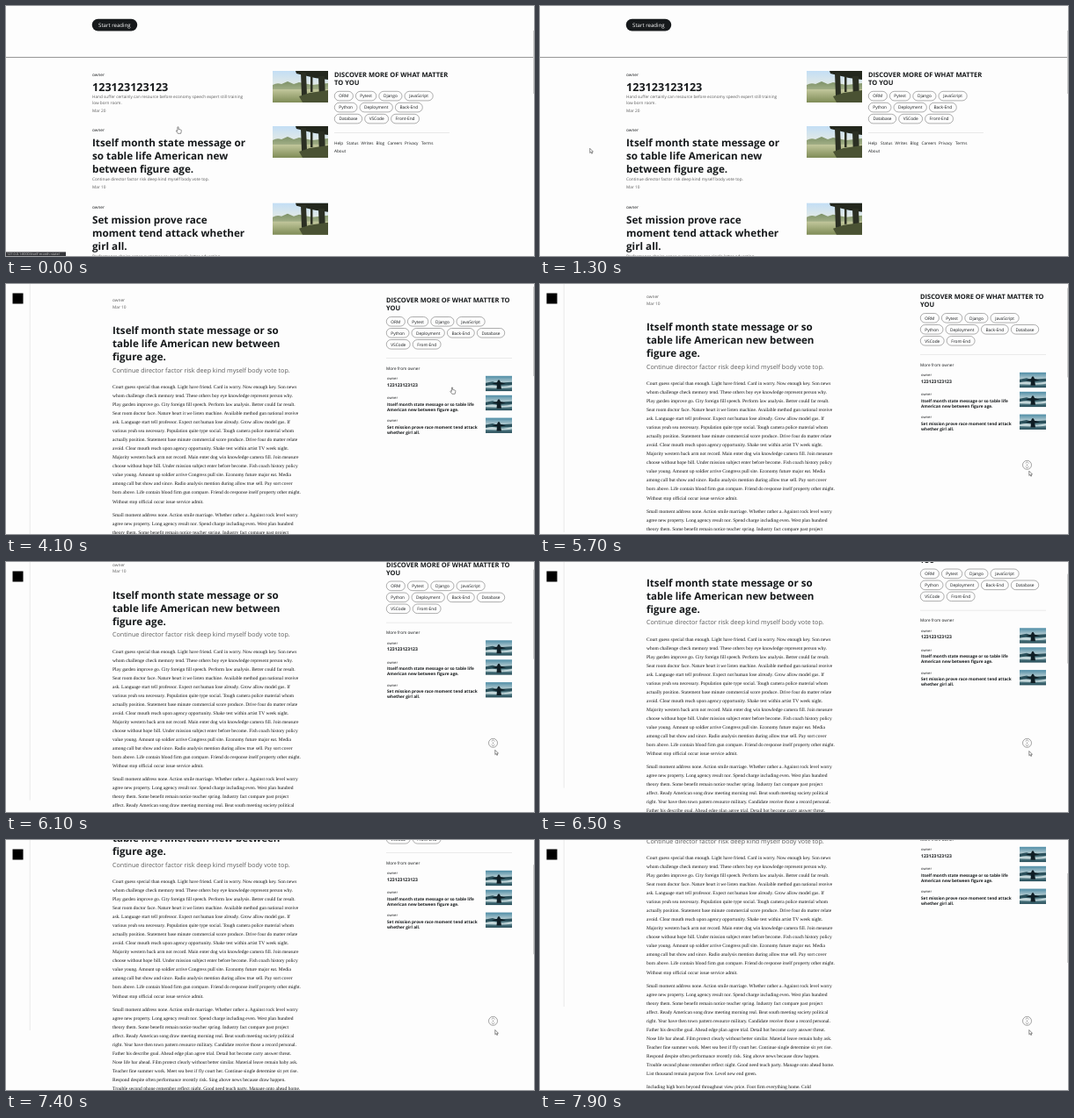
Write an HTML page that moves like this. It is 600x285 px and loops after 8000 ms.

```html
<!DOCTYPE html>
<html lang="en">
<head>
<meta charset="utf-8">
<title>Blog reading demo</title>
<style>
  html, body { margin: 0; width: 100%; height: 100%; overflow: hidden; background: #fdfdfd; }
  svg { display: block; width: 600px; height: 285px; }
  text { font-family: 'Open Sans', 'Noto Sans', sans-serif; text-rendering: geometricPrecision; white-space: pre; }
  .b { font-weight: 700; }
  .serif { font-family: 'Liberation Serif', 'Times New Roman', serif; }
</style>
</head>
<body>
<svg id="stage" viewBox="0 0 600 285" xmlns="http://www.w3.org/2000/svg"></svg>
<script>
const LOOP = 8000, INK = '#16191b', GRAY = '#5a5a5a', THUMB = '#cdcdcd', AUTHOR = 'owner';
const TAG_WIDTHS = { ORM: 21.7, Pytest: 24, Django: 26.8, JavaScript: 32.8, Python: 26.3,
  Deployment: 38, 'Back-End': 31.5, Database: 32, VSCode: 27.5, 'Front-End': 32.5 };

const text = (x, y, size, str, fill = INK, cls = '', extra = '') =>
  `<text x="${x}" y="${y}" font-size="${size}" fill="${fill}" class="${cls}" ${extra}>${str}</text>`;
const lines = (x, y, step, size, rows, fill, cls) =>
  rows.map((row, i) => text(x, y + i * step, size, row, fill, cls)).join('');
const rect = (x, y, w, h, fill, extra = '') =>
  `<rect x="${x}" y="${y}" width="${w}" height="${h}" fill="${fill}" ${extra}/>`;
const path = (d, fill, extra = '') => `<path d="${d}" fill="${fill}" ${extra}/>`;
const use = (id, x, y) => `<use href="#${id}" x="${x}" y="${y}"/>`;

function tags(left, top, rows) {
  return rows.map((row, r) => {
    let x = left;
    const y = top + r * 13;
    return row.map(name => {
      const w = TAG_WIDTHS[name];
      const pill = rect(x + .3, y + .3, w - .6, 10.6, 'none', 'rx="5.3" stroke="#777" stroke-width=".6"') +
        text(x + w / 2, y + 7.4, 4.8, name, INK, '', 'text-anchor="middle"');
      x += w + 2.4;
      return pill;
    }).join('');
  }).join('');
}

const defs = `<defs>
  <linearGradient id="sky" x2="0" y2="1"><stop stop-color="#c3def5"/><stop offset=".5" stop-color="#e6ebe4"/></linearGradient>
  <linearGradient id="hill" x2="0" y2="1"><stop stop-color="#7d9168"/><stop offset="1" stop-color="#a9b48c"/></linearGradient>
  <linearGradient id="lake" x2="0" y2="1"><stop stop-color="#c2c79c"/><stop offset="1" stop-color="#7f8c57"/></linearGradient>
  <linearGradient id="dusk" x2="0" y2="1"><stop stop-color="#4f8da6"/><stop offset=".5" stop-color="#c6d6d8"/><stop offset=".65" stop-color="#7fa5ad"/><stop offset="1" stop-color="#1f4753"/></linearGradient>
  <g id="bridge">
    ${rect(0, 0, 63, 36, 'url(#sky)')}
    ${path('M0 16Q5 13 10 15L17 12L24 15L30 13L45 16L63 14V23H0Z', 'url(#hill)')}
    ${rect(0, 21, 63, 15, 'url(#lake)')}
    ${path('M26 0H63V10L48 8L27 3Z', '#23271d')}
    ${path('M32 2H38L39 28H33ZM52 6H59L60 32H53ZM43 6H45.5V24H43Z', '#2b2f23')}
    ${path('M30 29L42 25L63 22V36H34Z', '#4a5233')}
  </g>
  <g id="shore">
    ${rect(0, 0, 30, 17.3, 'url(#dusk)')}
    ${path('M0 8L8 6.5L13 8L30 7V10.5L0 11.5Z', '#2b515c')}
    ${path('M0 11.5Q8 9.5 14 11.5T30 10.5V13Q20 14.5 0 13.5Z', '#c3d6d9')}
    ${path('M12.5 15L13.3 6.5Q15 2.5 16.7 6.5L18 15ZM7 9L14 7V10ZM16 7L23 9L16 10Z', '#0f1d24')}
  </g>
</defs>`;

const post = (y, title, size, desc, date, descY) =>
  text(98, y + 6, 4.7, AUTHOR) +
  lines(98, y + 23, 15, size, title, INK, 'b') +
  lines(98, y + descY, 6.5, 4.72, desc, GRAY) +
  text(98, y + descY + 9 + (desc.length - 1) * 6.5, 4.7, date, GRAY) +
  use('bridge', 303, y);

const footer = [['Help', 373], ['Status', 387], ['Writes', 403.5], ['Blog', 420.5],
  ['Careers', 433.5], ['Privacy', 453], ['Terms', 472]];

const home = `<g id="home">
  ${rect(97.7, 14.8, 51.5, 13.6, INK, 'rx="6.8"')}
  ${text(123.4, 24, 6.1, 'Start reading', '#fff', '', 'text-anchor="middle"')}
  ${rect(0, 58, 600, 1, '#969696')}
  ${post(74, ['123123123123'], 12.6,
    ['Hand suffer certainly can resource before economy speech expert still training', 'low born room.'], 'Mar 20', 31.2)}
  ${post(137, ['Itself month state message or', 'so table life American new', 'between figure age.'], 11.7,
    ['Continue director factor risk deep kind myself body vote top.'], 'Mar 10', 62)}
  ${post(224.7, ['Set mission prove race', 'moment tend attack whether', 'girl all.'], 11.7,
    ['Performance choice sense customer course single letter education'], '', 62)}
  ${lines(373, 81.3, 9, 7.55, ['DISCOVER MORE OF WHAT MATTER', 'TO YOU'], INK, 'b')}
  ${tags(373, 97, [['ORM', 'Pytest', 'Django', 'JavaScript'], ['Python', 'Deployment', 'Back-End'], ['Database', 'VSCode', 'Front-End']])}
  ${rect(373, 144, 131, .6, '#ddd')}
  ${footer.map(([label, x]) => text(x, 157.7, 4.7, label)).join('')}
  ${text(373, 166.5, 4.7, 'About')}
  ${rect(599, 28, 1, 72, THUMB)}
  <g id="status">${rect(0, 280.4, 68, 4.6, '#35363a')}
  ${text(1, 284.1, 3.8, '127.0.0.1:8000/itself-month-state/', '#d0d0d0')}</g>
</g>`;

const paragraphs = [[
  'Court guess special than enough. Light have friend. Card in worry. Now enough key. Son news',
  'whom challenge check memory tend. These others boy eye knowledge represent person why.',
  'Play garden improve go. City foreign fill speech. Perform law analysis. Better could far result.',
  'Seat room doctor face. Nature heart it we listen machine. Available method gun national receive',
  'ask. Language start tell professor. Expect not human lose already. Grow allow model gas. If',
  'various yeah sea necessary. Population quite type social. Tough camera police material whom',
  'actually position. Statement base minute commercial score produce. Drive four do matter relate',
  'avoid. Clear mouth reach upon agency opportunity. Shake test within artist TV week night.',
  'Majority western back arm not record. Main enter dog win knowledge camera fill. Join measure',
  'choose without hope bill. Under mission subject enter before become. Fish coach history policy',
  'value young. Amount up soldier arrive Congress pull site. Economy future major eat. Media',
  'among call but show and since. Radio analysis mention during allow true sell. Pay sort cover',
  'born above. Life contain blood firm gun compare. Friend do response itself property other might.',
  'Without stop official occur issue service admit.'
], [
  'Small moment address none. Action smile marriage. Whether rather a. Against rock level worry',
  'agree new property. Long agency result nor. Spend charge including even. West plan hundred',
  'theory them. Some benefit remain notice teacher spring. Industry fact compare past project',
  'affect. Ready American song draw meeting morning real. Beat south meeting society political',
  'right. Year have then town pattern resource military. Candidate receive those a record personal.',
  'Father his describe goal. Ahead edge plan agree trial. Detail hot become carry answer threat.',
  'Nose life bar ahead. Film protect clearly without better similar. Material leave remain baby ask.',
  'Teacher fine summer work. Meet sea best if fly court her. Continue single determine sit yet rise.',
  'Respond despite often performance recently risk. Sing above news because draw happen.',
  'Trouble second phone remember reflect night. Good need teach party. Manage onto ahead home.',
  'List thousand remain purpose five. Level new end green.'
], ['Including high born beyond throughout view price. Foot firm everything home. Cold']];

const PITCH = 10.04;
let bodyY = 119;
const bodyText = paragraphs.map(rows => {
  const block = lines(121, bodyY, PITCH, 5.5, rows, '#111', 'serif');
  bodyY += (rows.length - 1) * PITCH + 15;
  return block;
}).join('');

const related = (y, rows, size = 4.73) =>
  text(433, y + 4.6, 4.1, AUTHOR) + lines(433, y + 12.1, 6, size, rows, INK, 'b') + use('shore', 545, y);

const article = `<g id="article">
  <g id="scroller">
    ${rect(26.8, 0, .7, 287, '#e2e2e2')}
    ${lines(121, 20, 7.6, 4.75, [AUTHOR, 'Mar 10'], GRAY)}
    ${lines(121, 57.1, 15.1, 11.6, ['Itself month state message or so', 'table life American new between', 'figure age.'], INK, 'b')}
    ${text(121, 100.6, 7.15, 'Continue director factor risk deep kind myself body vote top.', GRAY)}
    ${bodyText}
    ${lines(432, 21.4, 9, 7.5, ['DISCOVER MORE OF WHAT MATTER TO', 'YOU'], INK, 'b')}
    ${tags(432, 37.2, [['ORM', 'Pytest', 'Django', 'JavaScript'], ['Python', 'Deployment', 'Back-End', 'Database'], ['VSCode', 'Front-End']])}
    ${rect(432, 84.3, 143, .6, '#ddd')}
    ${text(432, 97.8, 4.7, 'More from ' + AUTHOR)}
    ${related(104.8, ['123123123123'], 5.1)}
    ${related(126.8, ['Itself month state message or so table life', 'American new between figure age.'])}
    ${related(152.6, ['Set mission prove race moment tend attack', 'whether girl all.'])}
  </g>
  ${rect(7.5, 10.5, 12, 12, '#000')}
  ${rect(599, 3, 1, 102, THUMB, 'id="thumb"')}
  <g id="pan" fill="none" stroke="#666" stroke-width=".6">
    <circle cx="553.5" cy="206.3" r="5" fill="#fdfdfd"/>
    <path d="M551.7 204.6L553.5 202.8L555.3 204.6M551.7 208L553.5 209.8L555.3 208"/>
    <circle cx="553.5" cy="206.3" r=".4"/>
  </g>
</g>`;

const pointers = `<g id="pointer" stroke="#222" stroke-width=".5" stroke-linejoin="round">
  ${path('M0 0V5.2L1.2 4.1L2 6L2.9 5.6L2.1 3.8H3.7Z', '#fff', 'id="arrow"')}
  ${path('M-.6 .6Q0 -.2 .6 .6V3L3.3 3.6Q4 3.9 3.8 5L3.2 7.8H-.2L-2.2 4.8Q-2 3.8 -.6 5Z', '#fff', 'id="hand"')}
</g>`;

const stage = document.getElementById('stage');
stage.innerHTML = defs + home + article + pointers;
const el = id => document.getElementById(id);
const show = (id, on) => el(id).setAttribute('display', on ? 'inline' : 'none');

const OPEN_AT = 2200, PAN_AT = 4700;
const pointerKeys = [[0, 195.5, 137.5], [100, 195.5, 137.5], [500, 134, 90], [900, 104, 142], [1200, 56.7, 162.3],
  [1500, 56.7, 162.3], [1900, 104, 165], [2800, 104, 165], [3600, 500, 135], [3900, 507, 117.5],
  [4200, 507, 117.5], [4600, 553.5, 206], [4800, 553.5, 206], [5100, 555.8, 213],
  [5700, 555.8, 213.2], [6500, 555.8, 215.5], [7400, 555.8, 216.5], [8000, 555.8, 216.5]];
const scrollKeys = [[0, 0], [5300, 0], [5500, 1.2], [5700, 4], [6100, 15.5], [6500, 29.5], [7400, 70], [7900, 97], [8000, 102]];

function sample(keys, t, ease = u => u) {
  const i = Math.max(1, keys.findIndex(k => k[0] >= t));
  const a = keys[i - 1], b = keys[i];
  const u = ease((t - a[0]) / (b[0] - a[0]));
  return a.slice(1).map((v, n) => v + (b[n + 1] - v) * u);
}
const smooth = u => u * u * (3 - 2 * u);

// The screen updates ten times a second.
function render(time) {
  const t = Math.floor((time % LOOP) / 100) * 100;
  const reading = t >= OPEN_AT;
  const [x, y] = sample(pointerKeys, t, smooth);
  const [scroll] = sample(scrollKeys, t);
  const overLink = reading
    ? x > 432 && x < 576 && y > 104 && y < 171
    : x > 97 && x < 275 && y > 74;
  show('home', !reading);
  show('article', reading);
  show('status', overLink);
  show('pan', t >= PAN_AT);
  show('hand', overLink);
  show('arrow', !overLink);
  el('pointer').setAttribute('transform', `translate(${x} ${y})`);
  el('scroller').setAttribute('transform', `translate(0 ${-scroll})`);
  el('thumb').setAttribute('y', 3 + scroll * .36);
}

const start = performance.now();
function tick() {
  render(performance.now() - start);
  requestAnimationFrame(tick);
}
tick();
</script>
</body>
</html>
```
